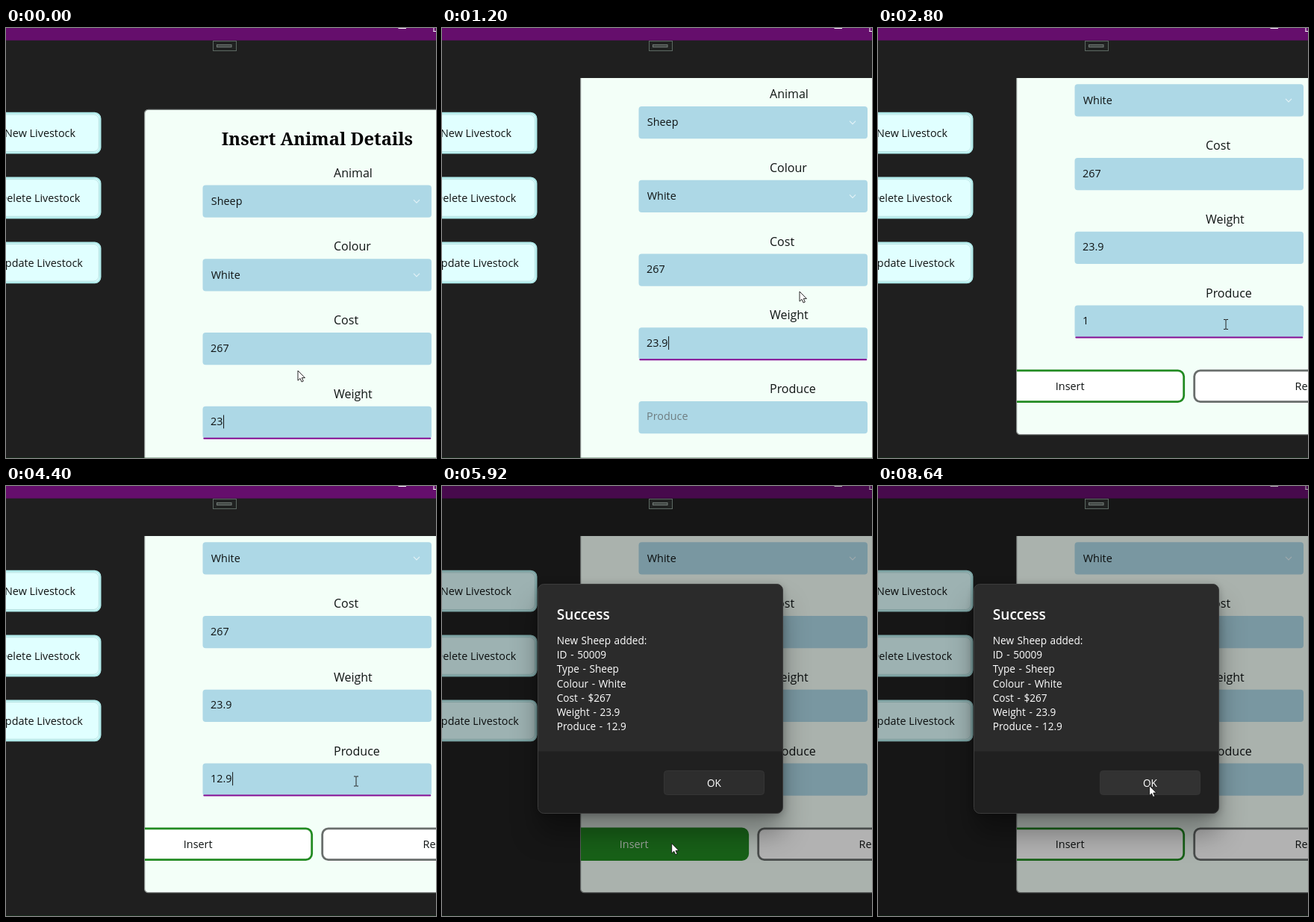
Animation, 576 px wide and 576 px high, one loop 8.72 s. Source, as an HTML page:

```html
<!DOCTYPE html>
<html lang="en">
<head>
<meta charset="utf-8">
<title>Insert Animal Details</title>
<style>
  html, body { margin: 0; width: 100%; height: 100%; overflow: hidden; background: #1f1f1f; }
  svg { display: block; width: 576px; height: 576px; }
  text { font: 14.4px "Open Sans", "Noto Sans", sans-serif; fill: #101414; white-space: pre; }
  .label { font-size: 16px; }
  .title { font: bold 23.7px "Noto Serif", Georgia, serif; fill: #000; }
  .mid { text-anchor: middle; }
  .end { text-anchor: end; }
  #dialog text { font-size: 13.6px; word-spacing: 1.1px; fill: #fff; }
  #dialog .head { font-size: 19.1px; font-weight: 600; }
  #shade { filter: drop-shadow(0 2px 6px rgba(0, 0, 0, .28)) drop-shadow(0 27px 17px rgba(0, 0, 0, .32)); }
</style>
</head>
<body>
<svg id="stage" viewBox="0 0 576 576"></svg>
<script>
const LOOP = 8720, STEP = 80, SCROLL = 234;
const stage = document.getElementById('stage');
const get = id => document.getElementById(id);

const rect = (x, y, w, h, attrs = '') => `<rect x="${x}" y="${y}" width="${w}" height="${h}" ${attrs}/>`;
const text = (x, y, str, attrs = '') => `<text x="${x}" y="${y}" ${attrs}>${str}</text>`;

const fieldY = i => 210.6 + 98.75 * i;

function field(label, i) {
  const y = fieldY(i), picker = i < 2;
  const chevron = `<path d="M546 ${y + 19.6}l4 4 4-4" fill="none" stroke="#e4f3f7" stroke-width="1.1"/>`;
  return text(439, y - 10.9, label, 'class="label"') +
    rect(263.5, y, 306.5, 43.2, 'rx="4" fill="#add8e6"') +
    (picker
      ? text(274.8, y + 26.2, ['Sheep', 'White'][i]) + chevron
      : text(274, y + 25.4, i == 2 ? '267' : '', `id="value${i}"`));
}

function sideButton(label, end, i) {
  const y = 113.9 + 86.8 * i;
  return rect(-60, y, 186.4, 53.6, 'rx="7.5" fill="#e0ffff" stroke="#afe9e9" stroke-width="2.2"') +
    rect(-60, y + 2, 184.4, 49.6, 'rx="7" fill="none" stroke="#8fc6c7" stroke-width=".5"') +
    text(end, y + 32.4, label, 'class="end"');
}

const sideButtons = [['Insert New Livestock', 93], ['Delete Livestock', 99.4], ['Update Livestock', 102.8]];
const report = ['New Sheep added:', 'ID - 50009', 'Type - Sheep', 'Colour - White',
  'Cost - $267', 'Weight - 23.9', 'Produce - 12.9'];

stage.innerHTML = `
  <defs>
    <clipPath id="view">${rect(185, 67, 391, 509)}</clipPath>
    <clipPath id="inner">${rect(186, 0, 390, 900)}</clipPath>
  </defs>
  ${rect(0, 0, 576, 576, 'fill="#1f1f1f"')}
  ${rect(0, 0, 576, 16.6, 'fill="#650e6c"')}
  ${sideButtons.map(([label, end], i) => sideButton(label, end, i)).join('')}
  <g clip-path="url(#view)"><g id="form">
    ${rect(185.6, 109.3, 420, 435.4 + SCROLL, 'rx="5" fill="#f3fff8" stroke="#858a88" stroke-width="1.3"')}
    ${text(417, 156.5, 'Insert Animal Details', 'class="title mid"')}
    ${['Animal', 'Colour', 'Cost', 'Weight', 'Produce'].map(field).join('')}
    ${rect(264.3, 0, 305, 2, 'id="focus" rx="1" fill="#850c93"')}
    ${rect(0, 0, 1, 18, 'id="caret" fill="#111"')}
    <g clip-path="url(#inner)">
      ${rect(104.5, 692.8, 305.2, 41.8, 'id="insert" rx="8" stroke="#228b22" stroke-width="2.8"')}
      ${rect(423.7, 692.8, 305.2, 41.8, 'rx="8" fill="#fff" stroke="#696e6c" stroke-width="2.8"')}
    </g>
    ${text(257.2, 719.1, 'Insert', 'id="insertLabel" class="mid"')}
    ${text(577, 719.1, 'Reset', 'class="mid"')}
  </g></g>
  ${rect(0, 575, 576, 1, 'fill="#0c4a1c" opacity=".35"')}
  <g fill="#fff">${rect(525.5, 0, 10.5, 1)}${rect(572.5, 0, 1, 5)}${rect(572.5, 4, 4, 1)}</g>
  ${rect(0, 0, 576, 576, 'id="smoke"')}
  <g stroke="#5d6963">
    ${rect(277.5, 17.5, 31, 13, 'fill="#202221"')}${rect(282.5, 22.5, 19.5, 3, 'fill="#3c413e" stroke="#727b77"')}
  </g>
  <g id="dialog">
    ${rect(128.5, 131.5, 328, 307, 'id="shade" rx="8" fill="#202020"')}
    <path d="M128.5 355.5V139.5a8 8 0 0 1 8-8h312a8 8 0 0 1 8 8v216z" fill="#2b2b2b"/>
    ${rect(128.5, 131.5, 328, 307, 'rx="8" fill="none" stroke="#3c3c3c"')}
    ${text(153.8, 178.8, 'Success', 'class="head"')}
    ${report.map((line, i) => text(153.8, 212 + 19.17 * i, line)).join('')}
    ${rect(297.5, 381.5, 134, 32, 'id="ok" rx="4" stroke="#353535"')}
    ${text(364.5, 402.8, 'OK', 'class="mid"')}
  </g>
  <path id="arrow" d="M0 0V13.2L3 10.4 5.1 15 7.3 14 5.3 9.6H9.4Z" fill="#fff" stroke="#111" stroke-width=".9"/>
  <path id="beam" d="M-3-6.5H-.8L0-6 .8-6.5H3M0-6V6M-3 6.5H-.8L0 6 .8 6.5H3" fill="none" stroke="#222"/>`;

const clamp = u => Math.max(0, Math.min(1, u));
const span = (t, from, to) => clamp((t - from) / (to - from));
const smooth = u => u * u * (3 - 2 * u);

// Pointer moves: start, end, x, y
const moves = [
  [0, 0, 391, 459], [560, 960, 479, 353], [1920, 2400, 466, 397],
  [4080, 4320, 469, 395.5], [4480, 5040, 307.7, 478.8], [6240, 6880, 363.5, 401.5]
];
function pointer(t) {
  let x = 0, y = 0;
  for (const [from, to, nx, ny] of moves) {
    const u = to > from ? smooth(span(t, from, to)) : 1;
    x += (nx - x) * u;
    y += (ny - y) * u;
  }
  return [x, y];
}

const typed = (str, times, t) => str.slice(0, times.filter(at => t >= at).length);
const show = (el, on) => el.setAttribute('visibility', on ? 'visible' : 'hidden');
const set = (el, attrs) => { for (const k in attrs) el.setAttribute(k, attrs[k]); };

function draw(t) {
  const left = 1 - span(t, 1078, 1549);
  const scroll = SCROLL * (1 - left * left);
  set(get('form'), { transform: `translate(0 ${-scroll})` });

  const produce = typed('12.9', [2800, 2960, 3200, 3440], t);
  get('value3').textContent = typed('23.9', [0, 0, 240, 480], t);
  get('value4').textContent = produce || 'Produce';
  get('value4').style.fill = produce ? '' : '#6f7d80';

  const active = t < 2480 ? 3 : 4, y = fieldY(active);
  const focused = t < 5200;
  const width = active == 4 && !produce ? 0 : get('value' + active).getComputedTextLength();
  set(get('focus'), { y: y + 41.8 });
  set(get('caret'), { x: 274.6 + width, y: y + 11.6 });
  show(get('focus'), focused);
  show(get('caret'), focused && t % 1060 < 560);

  const [px, py] = pointer(t);
  const over = (x0, y0, x1, y1) => px > x0 && px < x1 && py > y0 && py < y1;
  const hot = t < 6320 && over(185, 692 - scroll, 411, 737 - scroll);
  set(get('insert'), { fill: hot ? '#228b22' : '#fff' });
  get('insertLabel').style.fill = hot ? '#e4ece4' : '';
  set(get('ok'), { fill: over(297, 381, 432, 414) ? '#323232' : '#2d2d2d' });

  const open = span(t, 5280, 5520);
  const scale = 1 + .05 * (1 - open) ** 3;
  set(get('smoke'), { opacity: .3 * open });
  set(get('dialog'), {
    opacity: open,
    transform: `translate(292.5 285) scale(${scale}) translate(-292.5 -285)`
  });

  const inText = t < 5200 && over(263, fieldY(4) - scroll, 570, fieldY(4) + 43 - scroll);
  show(get('beam'), inText);
  show(get('arrow'), !inText);
  set(get(inText ? 'beam' : 'arrow'), { transform: `translate(${px} ${py})` });
}

const start = performance.now();
function tick() {
  const t = (performance.now() - start) % LOOP;
  draw(Math.floor(t / STEP) * STEP);
  requestAnimationFrame(tick);
}
tick();
</script>
</body>
</html>
```
